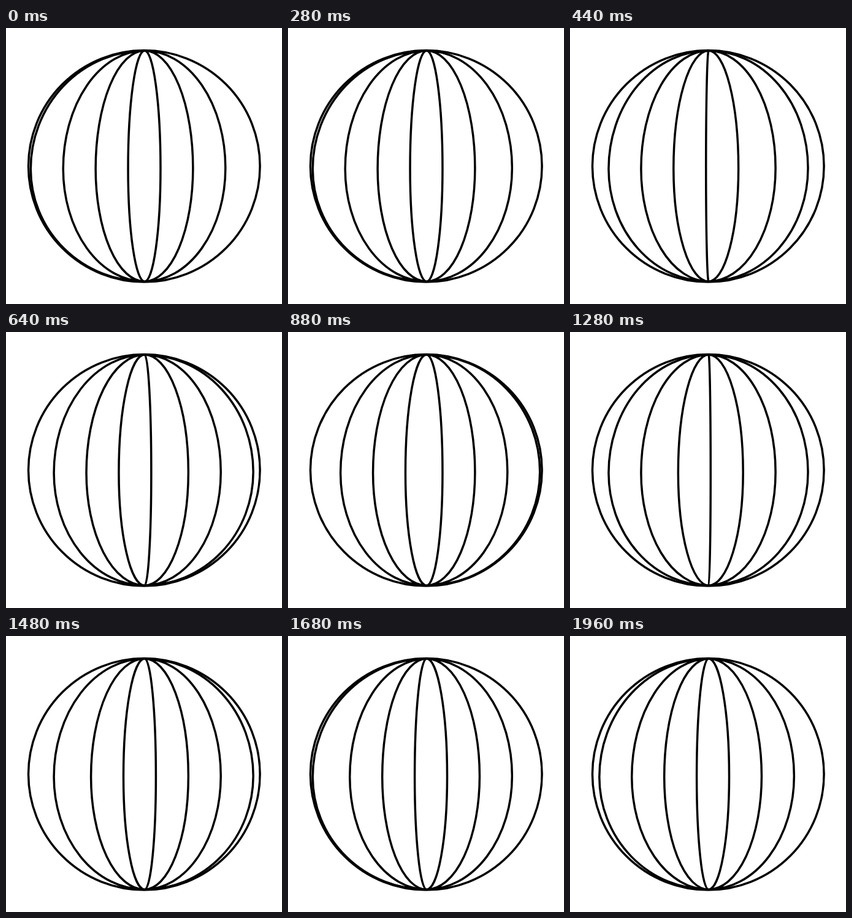
Recreate the animation shown at these times as an HTML page. Size 450 by 450 pixels, loop 2000 ms.

```html
<!DOCTYPE html>
<html>
<head>
<meta charset="utf-8">
<style>
  html, body { margin: 0; width: 100%; height: 100%; overflow: hidden; background: #fff; }
  svg { display: block; width: 450px; height: 450px; }
</style>
</head>
<body>
<svg viewBox="0 0 450 450" fill="none" stroke="#000" stroke-width="3.5">
  <circle cx="225.3" cy="225.3" r="188.8"/>
  <path id="meridians" stroke-linecap="round"/>
</svg>
<script>
const LOOP = 2000, STEPS = 50, LINES = 7, GAP = 7;
const LEFT = 36.5, WIDTH = 378, POLE = 226, TOP = 37, BOTTOM = 413.3;
const meridians = document.getElementById('meridians');

// Half ellipse from pole to pole; u runs from the left rim (0) to the right rim (1).
function arc(u) {
  const x = LEFT + WIDTH * u, y = 230 - 2 * u;
  const rx = Math.abs(x - POLE), sweep = x > POLE ? 1 : 0;
  return `M${POLE} ${TOP}A${rx} ${y - TOP} 0 0 ${sweep} ${x} ${y}` +
         `A${rx} ${BOTTOM - y} 0 0 ${sweep} ${POLE} ${BOTTOM}`;
}

function draw(now) {
  const step = Math.floor((now % LOOP) / LOOP * STEPS);
  let d = '';
  for (let i = 0; i < LINES; i++) {
    const k = (0.5 + i * GAP - step + STEPS) % STEPS;
    d += arc(k / STEPS);
  }
  meridians.setAttribute('d', d);
}

const start = performance.now();
function tick() {
  draw(performance.now() - start);
  requestAnimationFrame(tick);
}
tick();
</script>
</body>
</html>
```
